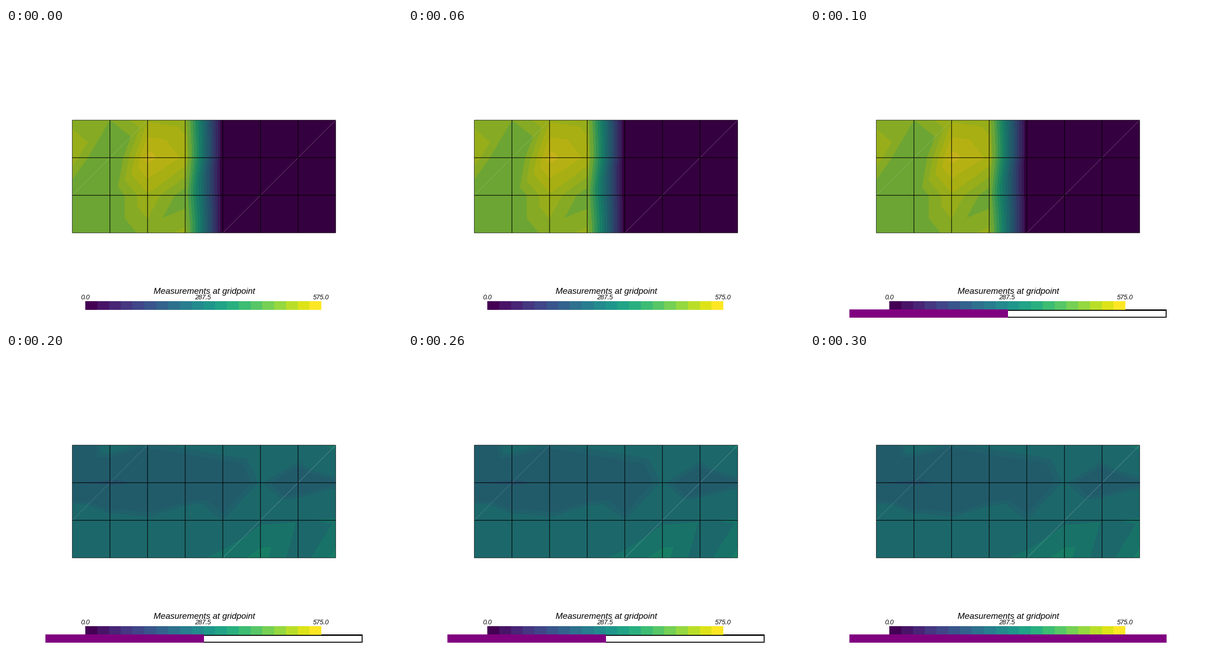
A matplotlib script for the animation above (400 ms loop, 864x648 px).

```python
import numpy as np
import matplotlib.pyplot as plt
from matplotlib.animation import FuncAnimation
from matplotlib.patches import Rectangle

W, H, DPI = 864, 648, 100
PX = 72 / DPI
CELL_X, CELL_Y = 82.1, 82
LEFT, TOP = W / 2 - 3.5 * CELL_X, H / 2 - 1.5 * CELL_Y
RIGHT, BOTTOM = W - LEFT, H - TOP
viridis = plt.get_cmap("viridis")

# Wide colour bands below, finer ones near the top of the range
LEVELS = np.sort(np.r_[np.arange(0, 0.8, 0.06), 0.412,
                       np.arange(0.86, 1.01, 0.03)])
SHADE = (0.78, 0.775, 0.75)
row, col = np.mgrid[0:4, 0:8]


def with_spots(base, spots):
    """Add single-point deviations (column, row, amount) to a smooth base."""
    z = base.astype(float)
    for i, j, amount in spots:
        z[j, i] += amount
    return z


def early_readings():
    """A ridge along column 2, fading by row; nothing measured past column 3."""
    ridge = np.interp(col, [1, 2, 3], [0, 1, 0.71])
    z = 5.6 * ridge * np.exp(-0.6 * abs(row - 1)) - 0.2
    z = with_spots(z, [(0, 0, 2), (0, 1, 2.9), (1, 0, 1.2), (1, 1, -1.2),
                       (3, 0, 0.5), (3, 2, -1.7), (3, 3, 1.3)])
    return np.where(col < 4, 0.83 + 0.03 * z, 0)


def late_readings():
    """A gentle rise to the right at a different height in every row."""
    z = 1.05 * col + np.array([-1.6, -8, 1.5, 6])[:, None]
    z = with_spots(z, [(0, 0, -3.5), (1, 0, 3.7), (7, 0, 4), (0, 1, 1.7),
                       (5, 1, 4), (6, 1, -2), (0, 2, 5), (2, 2, -2),
                       (4, 2, -4.8), (3, 3, -3), (5, 3, 7.6), (6, 3, -9),
                       (7, 3, 4.6)])
    return 0.412 + 0.0082 * z


def render(values):
    """Linear interpolation over two triangles per cell, cut into bands."""
    gx, gy = np.meshgrid((np.arange(145, 719) + 0.5 - LEFT) / CELL_X,
                         (np.arange(201, 447) + 0.5 - TOP) / CELL_Y)
    i, j = gx.astype(int), gy.astype(int)
    fx, fy = gx - i, gy - j
    a, b = values[j, i], values[j, i + 1]
    c, d = values[j + 1, i], values[j + 1, i + 1]
    upper = a + (b - a) * fx + (c - a) * fy
    lower = d + (c - d) * (1 - fx) + (b - d) * (1 - fy)
    field = np.where(fx + fy < 1, upper, lower)
    tones = LEVELS[:-1] + 0.6 * np.diff(LEVELS)
    tones[0] = 0
    colors = viridis(tones)[:, :3] * SHADE
    return colors[np.digitize(field, LEVELS[1:-1])]


fig = plt.figure(figsize=(W / DPI, H / DPI), dpi=DPI, facecolor="white")
ax = fig.add_axes([0, 0, 1, 1])
ax.axis("off")


def rect(x0, y0, x1, y1, color, z, aa=True):
    return ax.add_patch(Rectangle((x0, y0), x1 - x0, y1 - y0, fc=color,
                                  lw=0, aa=aa, zorder=z))


def line(x0, y0, x1, y1, color="black", w=1.2, alpha=1.0, z=4):
    ax.plot([x0, x1], [y0, y1], color=color, lw=w * PX, alpha=alpha,
            zorder=z, solid_capstyle="butt", snap=False)


def label(x, y, s, px):
    ax.text(x, y, s, family="Liberation Sans", style="italic", size=px * PX,
            ha="center", va="baseline", color="black", zorder=6)


images = [render(early_readings()), render(late_readings())]
mesh = ax.imshow(images[0], extent=(145, 719, 447, 201),
                 interpolation="nearest", aspect="auto", zorder=2)
ax.set_xlim(0, W)
ax.set_ylim(H, 0)

# Seams between triangles, then the cell edges
line(LEFT, TOP + 2 * CELL_Y, LEFT + 2 * CELL_X, TOP, "white", 0.8, 0.2, 3)
line(LEFT + 4 * CELL_X, BOTTOM, RIGHT, TOP, "white", 0.8, 0.3, 3)
for k in range(8):
    x = LEFT + k * CELL_X
    line(x, TOP, x, BOTTOM, w=1.2 if 0 < k < 7 else 0.85)
for k in range(4):
    y = TOP + k * CELL_Y
    line(LEFT, y, RIGHT, y, w=1.2 if 0 < k < 3 else 0.85)

# Colour bar
edges = np.linspace(173, 688, 21)
for k, (x0, x1) in enumerate(zip(edges, edges[1:])):
    rect(x0, 596, x1, 615, viridis(k / 19), 2, aa=False)
label(432.3, 579.5, "Measurements at gridpoint", 18.75)
for x, s in ((173.5, "0.0"), (430, "287.5"), (687.5, "575.0")):
    label(x, 591.5, s, 14)

# Progress bar: its outline lies under the colour bar, its fill above
outline = rect(86, 614, 778, 632, "black", 0)
inside = rect(88.5, 616.5, 775.5, 629.5, "white", 1)
fill = rect(86, 614, 778, 632, "purple", 7)


def update(k):
    mesh.set_data(images[k // 2])
    for part in (outline, inside, fill):
        part.set_visible(k > 0)
    fill.set_width(692 * ((k + 1) // 2) / 2)
    return mesh, outline, inside, fill


anim = FuncAnimation(fig, update, frames=4, interval=100, repeat=True,
                     repeat_delay=0, blit=False)
plt.show()
```
